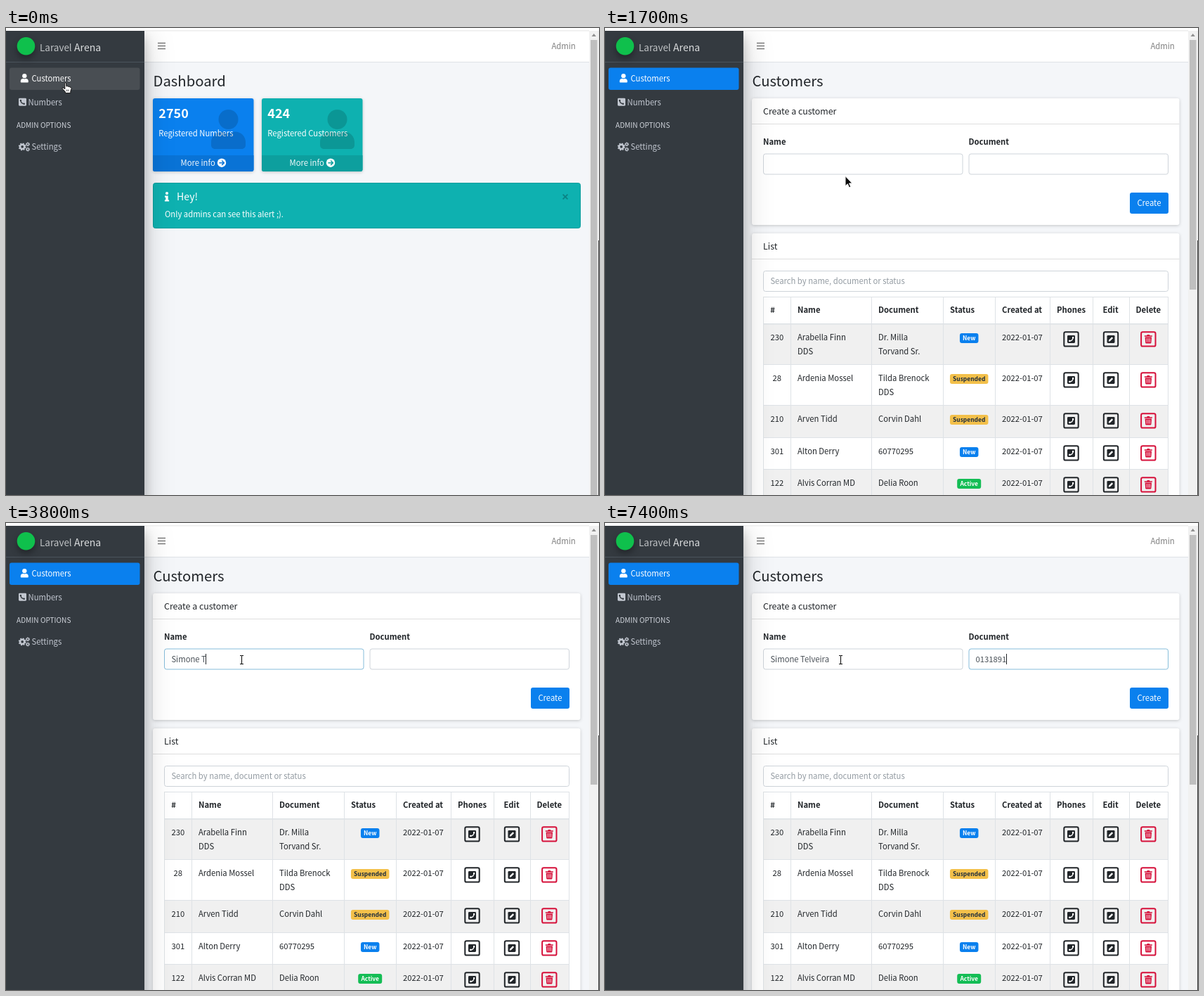
Animation, 844 px wide and 664 px high, one loop 8 s. Source, as an HTML page:

```html
<!DOCTYPE html>
<html lang="en">
<head>
<meta charset="utf-8">
<title>Customers dashboard</title>
<style>
html, body { margin: 0; width: 100%; height: 100%; overflow: hidden; background: #fff; }
svg { display: block; width: 844px; height: 664px; }
text {
  font: 11.27px "Noto Sans CJK SC", "Noto Sans CJK JP", "Noto Sans CJK KR", "Noto Sans CJK TC", "Noto Sans", "Open Sans", sans-serif;
  fill: #212529; white-space: pre;
}
.b { font-weight: 700; }
.mid { text-anchor: middle; }
.card { filter: drop-shadow(0 1px 2px rgba(0,0,0,.2)); }
.side { filter: drop-shadow(0 8px 8px rgba(0,0,0,.2)) drop-shadow(0 8px 20px rgba(0,0,0,.2)); }
.logo { filter: drop-shadow(0 5px 5px rgba(0,0,0,.35)); }
</style>
</head>
<body>
<svg id="stage" viewBox="0 0 844 664" xmlns="http://www.w3.org/2000/svg"></svg>
<script>
const BLUE = '#0a80ee', TEAL = '#0eb1b0', GREEN = '#14bd55', AMBER = '#f3c04a', RED = '#d5103a';
const DARK = '#343a40', INK = '#212529', MUTED = '#c2c7d0', LINE = '#dee2e6';
const EDGE = '#ced4da', FOCUS = '#86bddb', FIELD_INK = '#495057';
const LOOP = 8000;

// Drawing helpers
const rect = (x, y, w, h, fill, r = 0, more = '') =>
  `<rect x="${x}" y="${y}" width="${w}" height="${h}" rx="${r}" fill="${fill}" ${more}/>`;
const text = (x, y, s, fill = INK, size = 11.27, cls = '') =>
  `<text x="${x}" y="${y}" class="${cls}" style="fill:${fill};font-size:${size}px">${s}</text>`;
const move = (x, y, body, k = 1) => `<g transform="translate(${x} ${y}) scale(${k})">${body}</g>`;
const group = (id, body) => `<g id="${id}">${body}</g>`;
const stroke = (d, color, w, more = '') =>
  `<path d="${d}" fill="none" stroke="${color}" stroke-width="${w}" ${more}/>`;
const field = (x, y, w, id = '') =>
  rect(x + .5, y + .5, w - 1, 29, '#fff', 3, `stroke="${EDGE}" id="${id}"`);

// Icons
const user = (x, y, k, fill) => move(x, y,
  `<g fill="${fill}"><circle cx="224" cy="128" r="128"/><path d="M314 288h-17a175 175 0 0 1-146 0h-17C60 288 0 348 0 422v42c0 27 21 48 48 48h352c27 0 48-21 48-48v-42c0-74-60-134-134-134z"/></g>`, k);

const phone = (x, y, fill, cut, flip = false) => move(x, y, rect(0, 0, 11, 11, fill, 1.4) +
  `<g ${flip ? 'transform="translate(11 0) scale(-1 1)"' : ''}>` +
  stroke('M3 2.8C3 6 5 8 8.2 8', cut, 1.4) + stroke('M2.9 2.2v2.3M6.5 8h2.3', cut, 2.1) + '</g>');

const pencil = (x, y) => move(x, y, rect(0, 0, 11, 11, INK, 1.4) +
  '<path d="M2.2 8.8l.5-2.2L6.9 2.4l1.7 1.7L4.4 8.3z" fill="#fff"/>');

const trash = (x, y) => move(x, y,
  `<path d="M0 1.2h3.2L4 0h3l.8 1.2H11v1.4H0zM.8 3.3h9.4l-.6 8.2q-.1 1-1.1 1h-6q-1 0-1.1-1z" fill="${RED}"/>` +
  stroke('M3.3 5v5.6M5.5 5v5.6M7.7 5v5.6', '#fff', .8));

const gear = (x, y, r, teeth) => {
  const step = 2 * Math.PI * r / teeth;
  return `<g fill="none" stroke="${MUTED}"><circle cx="${x}" cy="${y}" r="${r * .68}" stroke-width="${r * .55}"/>` +
    `<circle cx="${x}" cy="${y}" r="${r}" stroke-width="${r * .36}" stroke-dasharray="${step * .55} ${step * .45}"/></g>`;
};

const goIcon = (x, y, cut) => `<circle cx="${x}" cy="${y}" r="6.2" fill="#fff"/>` +
  stroke(`M${x - 3.6} ${y}h6.6M${x + .2} ${y - 3.2}l3.2 3.2l-3.2 3.2`, cut, 1.5);

const frame = (x, y, color, body) =>
  rect(x - 10.2, y - 10.2, 20.4, 20.4, 'none', 2.2, `stroke="${color}" stroke-width="2"`) + body;

// Dashboard page
const statBox = (x, color, foot, count, label) =>
  rect(x, 100, 143.5, 104, color, 3, 'class="card"') +
  `<path d="M${x} 181h143.5v20q0 3-3 3h-137.5q-3 0-3-3z" fill="${foot}"/>` +
  text(x + 8.3, 128, count, '#fff', 18, 'b') + text(x + 8.3, 154, label, '#fff') +
  user(x + 83, 116, .1094, 'rgba(0,0,0,.15)') +
  text(x + 39.5, 196, 'More info', '#f4f8fb') + goIcon(x + 98, 191.7, foot);

const dashboard = text(209.5, 83, 'Dashboard', INK, 20.3) +
  statBox(209, BLUE, '#0973d6', '2750', 'Registered Numbers') +
  statBox(364, TEAL, '#0d9f9e', '424', 'Registered Customers') +
  rect(209.5, 220.5, 608, 64, TEAL, 3, 'stroke="#0c9d9c"') +
  '<circle cx="229" cy="235" r="2.1" fill="#fff"/><path d="M226 238.5h4.7v5.9h1.4v2.2h-6.2v-2.2h1.4v-3.7H226z" fill="#fff"/>' +
  text(243, 245, 'Hey!', '#fff', 14.1) +
  text(226, 269, 'Only admins can see this alert ;).', '#fff') +
  stroke('M792.6 236.6l6.8 6.8M799.4 236.6l-6.8 6.8', '#0b8283', 1.7);

// Customers page
const badges = { New: [BLUE, '#fff', 26.5], Suspended: [AMBER, '#1f2d3d', 54.5], Active: [GREEN, '#fff', 34] };
const badge = (y, name) => {
  const [bg, fg, w] = badges[name];
  return rect(518.2 - w / 2, y - 7, w, 14, bg, 3) + text(518.2, y + 3.2, name, fg, 8.45, 'b mid');
};

const rows = [
  [421, 58, 230, 'Arabella Finn|DDS', 'Dr. Milla|Torvand Sr.', 'New'],
  [479, 58, 28, 'Ardenia Mossel', 'Tilda Brenock|DDS', 'Suspended'],
  [537, 46, 210, 'Arven Tidd', 'Corvin Dahl', 'Suspended'],
  [583, 45, 301, 'Alton Derry', '60770295', 'New'],
  [628, 46, 122, 'Alvis Corran MD', 'Delia Roon', 'Active']
];
const lines = (x, y, s) => s.split('|').map((part, i) => text(x, y + i * 19.3, part)).join('');
const row = ([y, h, id, name, doc, status], i) => {
  const base = y + 23.2, mid = y + 21.4;
  return (i % 2 ? '' : rect(225, y, 577, h, '#f0f0f0')) +
    stroke(`M225 ${y + h - .5}h577`, LINE, 1) +
    text(244.8, base, id, INK, 11.27, 'mid') + lines(274, base, name) + lines(389, base, doc) +
    badge(y + 20, status) + text(565, base, '2022-01-07') +
    frame(663.5, mid, INK, phone(658, mid - 5.5, INK, '#fff', true)) +
    frame(720, mid, INK, pencil(714.5, mid - 5.5)) +
    frame(773.3, mid, RED, trash(767.8, mid - 6.3));
};
const heads = [[235.2, '#'], [274, 'Name'], [389, 'Document'], [491, 'Status'], [565, 'Created at'],
  [643, 'Phones'], [708.5, 'Edit'], [755.5, 'Delete']];
const columns = [225, 264, 379, 481, 555, 633, 694, 746, 801];

const card = (y, h, title) => rect(209, y, 608.5, h, '#fff', 3, 'class="card"') +
  stroke(`M209 ${y + 36.5}h608.5`, '#dfdfdf', 1) + text(225, y + 23, title, INK, 12.4);

const customers = text(209.5, 83, 'Customers', INK, 20.3) +
  card(100, 180, 'Create a customer') +
  text(225, 166, 'Name', INK, 11.27, 'b') + text(517.5, 166, 'Document', INK, 11.27, 'b') +
  field(225, 178.5, 284.5, 'nameBox') + field(517.5, 178.5, 284.5, 'docBox') +
  `<text id="nameText" x="235.4" y="198" style="fill:${FIELD_INK}"></text>` +
  `<text id="docText" x="527.6" y="198" style="fill:${FIELD_INK}"></text>` +
  rect(0, 186, 1, 15, INK, 0, 'id="caret"') +
  rect(747, 234, 55, 30, BLUE, 3) + text(774.4, 253, 'Create', '#fff', 11.27, 'mid') +
  card(292, 400, 'List') + field(225, 345, 577) +
  text(235.4, 364, 'Search by name, document or status', '#939ba2') +
  rows.map(row).join('') +
  stroke('M225 382.5h577', LINE, 1) + stroke('M225 420.7h577', LINE, 1.6) +
  columns.map(x => stroke(`M${x + .5} 382v282`, LINE, 1)).join('') +
  heads.map(([x, s]) => text(x, 405, s, INK, 11.27, 'b')).join('');

// Shell
const shell = rect(0, 4, 197, 700, DARK, 0, 'class="side"') +
  rect(0, 0, 844, 4, '#fff') + stroke('M197 3.9h633', '#e4e4e4', 1) +
  stroke('M0 48.5h197', '#4b545c', 1) +
  '<circle class="logo" cx="28.5" cy="25.8" r="12.8" fill="#0fc04c"/>' +
  text(48, 32.5, 'Laravel', '#bfc2c4', 13.5).replace('style="', 'style="font-weight:300;') +
  text(97, 32.5, 'Arena', '#d9dbdc', 14.1) +
  rect(5, 56.5, 185.5, 31.5, '#494e53', 3, 'id="itemOne"') +
  rect(5, 90, 185.5, 31.5, '#494e53', 3, 'id="itemTwo"') +
  user(20.8, 65, .0246, '#fff') + text(36.5, 76, 'Customers', '#fff') +
  group('plain', phone(18, 99.7, MUTED, DARK) + text(31.5, 110, 'Numbers', MUTED)) +
  group('lit', phone(18, 99.7, '#fff', '#494e53') + text(31.5, 110, 'Numbers', '#fff')) +
  text(15, 142.3, 'ADMIN OPTIONS', '#d0d4db', 10.14) +
  gear(23.2, 168.8, 4.6, 8) + gear(31, 165.3, 2.5, 6) + gear(31, 172.6, 2.5, 6) +
  text(36.5, 173, 'Settings', MUTED);

const bar = rect(197, 4, 633, 44, '#fff') + rect(197, 48, 633, 1, LINE) +
  stroke('M216 21.5h11M216 25.5h11M216 29.5h11', '#7b7b7b', 1.6) +
  text(776.5, 30, 'Admin', '#7f7f7f');

const scroll = rect(830, 4, 14, 660, '#f1f1f1') +
  '<path d="M833.5 12l3.2-4 3.2 4z" fill="#909090"/>' +
  rect(832, 17, 9.5, 647, '#bfbfbf', 0, 'id="thumb"') + rect(843, 302, 1, 362, '#444');

// Pointers, drawn around their hot spot
const pointers =
  group('hand', '<path d="M-.9 .5Q0-.6 1 .5L1.5 5 3 4.6 4 5.3 5.6 5.2 6.3 6.1 7.9 6.4Q8.6 7 8.5 8.5L7.4 12V14.4H-.2V12.6L-4.5 8.2Q-4.9 6.8-3.4 6.9L-.6 8.6Z" fill="#fff" stroke="#111" stroke-width="1"/>' +
    stroke('M2 9.5v2.6M4 9.5v2.6', '#111', .7)) +
  group('arrow', '<path d="M0 0V14.2L3.3 11.2 5.5 16.3 7.8 15.3 5.6 10.4H10Z" fill="#0b0b0b" stroke="#fff" stroke-width="1"/>') +
  group('beam', stroke('M-2.5-6H-.7L0-5.4 .7-6H2.5M0-5.4V5.4M-2.5 6H-.7L0 5.4 .7 6H2.5', '#fff', 2.6) +
    stroke('M-2.5-6H-.7L0-5.4 .7-6H2.5M0-5.4V5.4M-2.5 6H-.7L0 5.4 .7 6H2.5', '#111', 1.1));

const stage = document.getElementById('stage');
stage.innerHTML = rect(197, 4, 633, 660, '#f4f6f9') + group('dashboard', dashboard) +
  group('customers', customers) + bar + shell + scroll + pointers;

const el = id => document.getElementById(id);
const ui = {};
stage.querySelectorAll('[id]').forEach(node => { ui[node.id] = node; });

// Steps: [time, value...]; the last one reached holds
const NAME = 'Simone Telveira', DOC = '0131891';
const OPEN = 1200;
const path = [[0, 'hand', 84.5, 78], [100, 'arrow', 86, 75], [1200, 'arrow', 129, 112],
  [1300, 'arrow', 284, 254], [1500, 'arrow', 318, 240], [1600, 'arrow', 336, 221],
  [1700, 'arrow', 342, 210.5], [1800, 'beam', 339.5, 202], [1900, 'beam', 337.5, 197.5],
  [2000, 'beam', 336, 195], [2100, 'beam', 335.5, 194.5]];
const nameKeys = [[0, 0], [2900, 1], [3100, 3], [3300, 4], [3400, 5], [3600, 7], [3800, 8],
  [4000, 10], [4200, 11], [4300, 12], [4600, 14], [4700, 15]];
const docKeys = [[0, 0], [5400, 1], [5600, 2], [5800, 4], [5900, 5], [6100, 6], [6200, 7]];
const carets = [[0, ''], [2900, 'name'], [4900, 'doc'], [6800, ''], [7400, 'doc']];
const nameEdge = [[0, EDGE], [2000, '#aac9db'], [2100, FOCUS], [5000, EDGE]];
const docEdge = [[0, EDGE], [5000, FOCUS]];

const at = (steps, t) => steps.filter(s => s[0] <= t).pop().slice(1);
const show = (node, on) => node.setAttribute('visibility', on ? 'visible' : 'hidden');

function draw(t) {
  const open = t >= OPEN, hover = open && t < 1300;
  ui.dashboard.style.display = open ? 'none' : '';
  ui.customers.style.display = open ? '' : 'none';
  ui.itemOne.setAttribute('fill', open ? BLUE : '#494e53');
  ui.thumb.setAttribute('height', open ? 355 : 647);
  show(ui.itemTwo, hover);
  show(ui.lit, hover);
  show(ui.plain, !hover);

  const [kind, x, y] = at(path, t);
  ['hand', 'arrow', 'beam'].forEach(k => show(ui[k], k === kind));
  ui[kind].setAttribute('transform', `translate(${x} ${y})`);

  ui.nameText.textContent = NAME.slice(0, at(nameKeys, t)[0]);
  ui.docText.textContent = DOC.slice(0, at(docKeys, t)[0]);
  ui.nameBox.setAttribute('stroke', at(nameEdge, t)[0]);
  ui.docBox.setAttribute('stroke', at(docEdge, t)[0]);

  const [where] = at(carets, t);
  show(ui.caret, where !== '');
  if (where) {
    const node = ui[where + 'Text'];
    const end = node.textContent ? node.getComputedTextLength() : 0;
    ui.caret.setAttribute('x', Math.floor(+node.getAttribute('x') + end));
  }
}

const start = performance.now();
function tick() {
  draw((performance.now() - start) % LOOP);
  requestAnimationFrame(tick);
}
tick();
</script>
</body>
</html>
```
